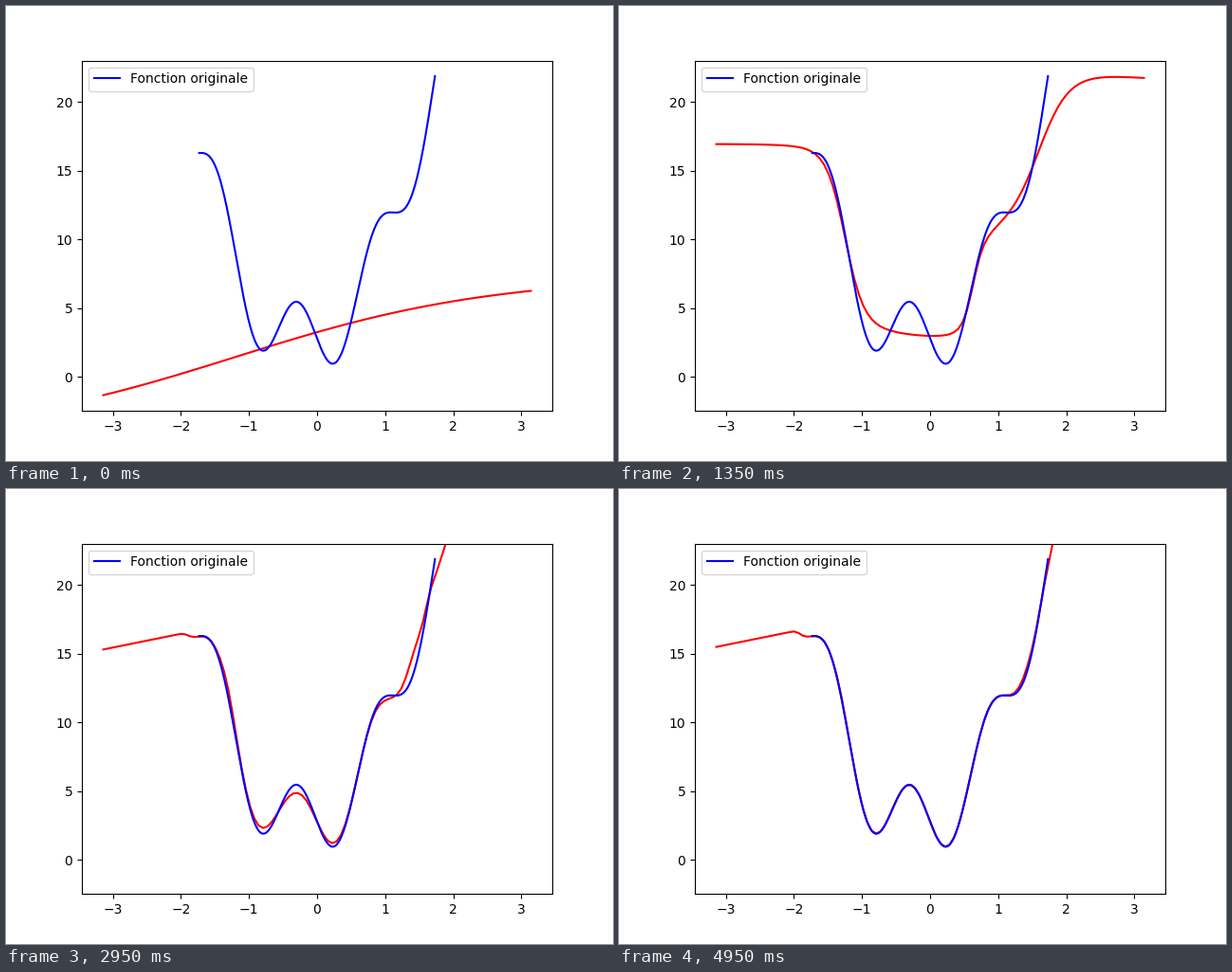
These frames come from a looping animation (640x480 px, 5000 ms). A matplotlib script:

```python
import numpy as np
import matplotlib.pyplot as plt
from matplotlib.animation import FuncAnimation

FRAMES, STEP = 100, 50
PI = np.pi
GRID = np.linspace(-PI, PI, 100)


def wave(x):
    """Blue curve, x in standardised units."""
    t = x * PI / np.sqrt(3)
    return (3.65 + 0.89 * t + 1.385 * t**2
            - 1.115 * np.cos(t) + 0.45 * np.cos(2 * t) - 0.2 * np.cos(3 * t)
            + 0.27 * np.sin(t) - 2.77 * np.sin(3 * t))


def steps(base, *parts):
    """Sum of smooth steps, each (height, centre, width)."""
    return base + sum(h / (1 + np.exp((c - GRID) / w)) for h, c, w in parts)


def bump(centre, width):
    return np.exp(-((GRID - centre) / width) ** 2)


def soft_min(a, b, s=0.25):
    return -s * np.logaddexp(-a / s, -b / s)


# Stages of the fit before it picks up the inner wave
SLOPE = steps(-4.45, (11.8, -1.2, 1.9))
VALLEY = steps(14.5, (-13.5, -0.95, 0.42), (16, 0.797, 0.216), (-8, 2.9, 0.8))
STAIRS = steps(17.3, (-14.25, -1.25, 0.136), (7.15, 0.63, 0.076),
               (12.9, 1.6, 0.22))

# What the late fit still gets wrong: the inner wave and the outer flanks
INNER = (1.8 * bump(-0.78, 0.22) - 2.5 * bump(-0.31, 0.24)
         + 1.1 * bump(0.23, 0.22) - 1.2 * bump(1, 0.18))
FLANKS = 1.5 * bump(1.42, 0.17) + 0.6 * bump(-1.3, 0.15)
EDGE = 1.65


def close_fit(ms):
    """Blue curve plus errors that die away, with straight tails."""
    inner = min(1, np.exp((2300 - ms) / 450))
    flanks = min(1, np.exp((2950 - ms) / 1300))
    left = 15.5 - 0.8 * inner + GRID + PI
    right = wave(EDGE) + (27 - 10 * flanks - 6 * inner) * (GRID - EDGE)
    y = np.where(GRID > EDGE, right, soft_min(left, wave(GRID)))
    return y + inner * INNER + flanks * FLANKS


def mix(a, b, s):
    return a + (b - a) * s


def fitted(ms):
    if ms < 850:
        return mix(SLOPE, VALLEY, (ms / 850) ** 1.4)
    if ms < 1850:
        return mix(VALLEY, STAIRS, 1 - (1 - (ms - 850) / 1000) ** 3)
    return mix(STAIRS, close_fit(ms), min(1, (ms - 1850) / 600))


fig, ax = plt.subplots(figsize=(6.4, 4.8), dpi=100)
ax.set_xlim(-1.1 * PI, 1.1 * PI)
ax.set_ylim(-2.476, 23.014)

blue_x = np.linspace(-np.sqrt(3), np.sqrt(3), 300)
red, = ax.plot(GRID, fitted(0), "r", lw=1.5)
ax.plot(blue_x, wave(blue_x), "b", lw=1.5, label="Fonction originale")
ax.legend(loc="upper left")


def draw(i):
    red.set_ydata(fitted(i * STEP))
    return red,


anim = FuncAnimation(fig, draw, frames=FRAMES, interval=STEP,
                     repeat=True, repeat_delay=0)
plt.show()
```
